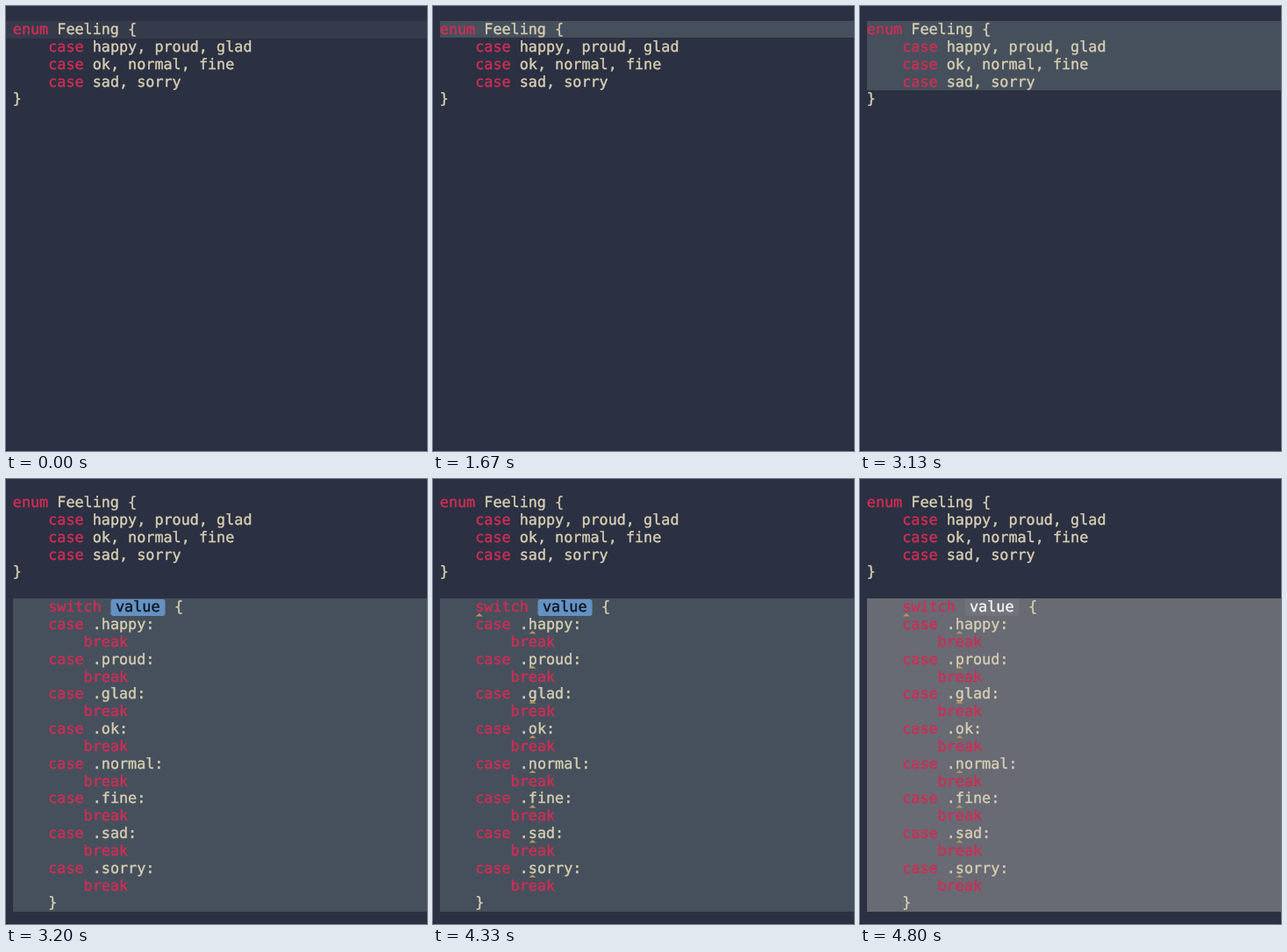
An HTML page that plays this animation: 480 px wide and 507 px high, repeating every 4870 ms.

```html
<!DOCTYPE html>
<html lang="en">
<head>
<meta charset="utf-8">
<title>Enum to switch</title>
<style>
  html, body { margin: 0; width: 100%; height: 100%; overflow: hidden; background: #1f2231; }
  svg { display: block; width: 480px; height: 507px; }
  text {
    font: 16.78px "DejaVu Sans Mono", monospace;
    fill: #d6ceb2; stroke: #d6ceb2; stroke-width: 0.4;
    text-rendering: geometricPrecision;
  }
  .key { fill: #d02d55; stroke: #d02d55; }
  .caret { fill: #b8955a; }
</style>
</head>
<body>
<svg id="stage" viewBox="0 0 480 507"></svg>
<script>
const LOOP = 4870, LEFT = 7.8, TOP = 16.6, COL = 10.1, ROW = 19.84;
const PASTE = 3200, CARETS = 3600, BLUR = 4800;
const SELECT = [1670, 1870, 2070, 2270];
const SELECTED = "#46505c", INACTIVE = "#686a74";
const stage = document.getElementById("stage");

function add(tag, attrs, parent = stage, content = "") {
  const el = document.createElementNS("http://www.w3.org/2000/svg", tag);
  for (const name in attrs) el.setAttribute(name, attrs[name]);
  el.textContent = content;
  parent.append(el);
  return el;
}

const rowTop = row => TOP + row * ROW;
const edge = row => Math.round(rowTop(row));

function write(parent, row, x, content, keyword) {
  const attrs = { x, y: rowTop(row) + 15.5 };
  if (keyword) attrs.class = "key";
  return add("text", attrs, parent, content);
}

function writeLine(parent, row, line) {
  for (const m of line.matchAll(/\S+/g)) {
    const keyword = /^(enum|case|switch|break)$/.test(m[0]);
    write(parent, row, LEFT + m.index * COL, m[0], keyword);
  }
}

function addCaret(row, x) {
  const y = rowTop(row + 1) + 1;
  add("path", { class: "caret", d: `M${x - 4} ${y}l4 -3.4l4 3.4z` }, carets);
}

add("path", { d: "M0 0H480V503Q480 507 476 507H4Q0 507 0 503Z", fill: "#2b3042" });
const currentLine = add("rect", { x: 0, y: edge(0), width: 480, height: 20, fill: "#363b4c" });
const selection = add("rect", { x: 8, width: 472 });

const declaration = add("g", {});
[
  "enum Feeling {",
  "    case happy, proud, glad",
  "    case ok, normal, fine",
  "    case sad, sorry",
  "}"
].forEach((line, row) => writeLine(declaration, row, line));

const pasted = add("g", {});
const carets = add("g", {});
writeLine(pasted, 6, "    switch");
const token = add("rect", { x: 119.5, y: edge(6) + 1, width: 62, height: 19, rx: 3 }, pasted);
const tokenText = write(pasted, 6, 125, "value");
write(pasted, 6, 192, "{");
addCaret(6, 52.8);

["happy", "proud", "glad", "ok", "normal", "fine", "sad", "sorry"].forEach((name, i) => {
  const row = 7 + 2 * i;
  writeLine(pasted, row, `    case .${name}:`);
  writeLine(pasted, row + 1, "        break");
  addCaret(row, 113.5);
});
writeLine(pasted, 23, "    }");

const show = (el, on) => el.style.visibility = on ? "visible" : "hidden";

function render(t) {
  const hasPaste = t >= PASTE, blurred = t >= BLUR;
  const first = hasPaste ? 6 : 0;
  const rows = hasPaste ? 18 : SELECT.filter(time => t >= time).length;
  show(currentLine, rows === 0);
  show(pasted, hasPaste);
  show(carets, t >= CARETS);
  selection.setAttribute("y", edge(first));
  selection.setAttribute("height", edge(first + rows) - edge(first));
  selection.setAttribute("fill", blurred ? INACTIVE : SELECTED);
  token.setAttribute("fill", blurred ? "#70737b" : "#6492c2");
  tokenText.style.fill = tokenText.style.stroke = blurred ? "#f4f4f4" : "#0d1522";
}

const start = performance.now();
function tick() {
  render((performance.now() - start) % LOOP);
  requestAnimationFrame(tick);
}
tick();
</script>
</body>
</html>
```
